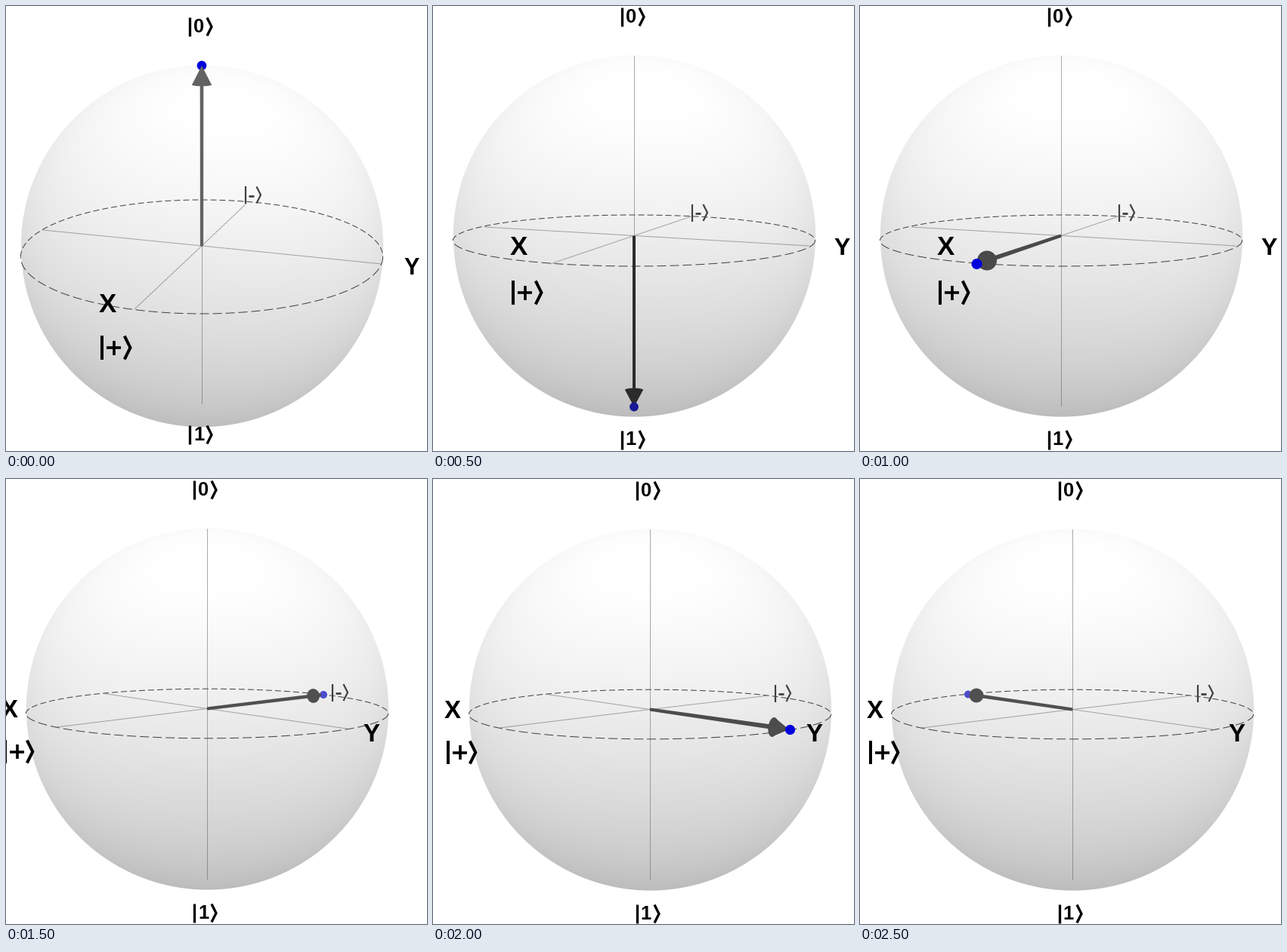
Recreate the animation shown at these times as a matplotlib script. Size 557 by 590 pixels, loop 3 s.

```python
import matplotlib.pyplot as plt
import numpy as np
from matplotlib.animation import ArtistAnimation
from matplotlib.patches import Circle, Polygon

W, H, DPI = 557, 590, 64
PT = 72 / DPI  # points per pixel
R = 239.6
INK, THIN, FAINT = "#000000", "#585858", "#404040"
BLUE, DIM_BLUE, DARK_BLUE = "#0000dc", "#4c4ccb", "#181896"

fig = plt.figure(figsize=(W / DPI, H / DPI), dpi=DPI, facecolor="white")
ax = fig.add_axes([0, 0, 1, 1])
ax.axis("off")

# Camera views; every position is an offset in pixels from the origin of the axes.
HIGH = dict(
    light=(0.25, 0.70), ring=(14.5, 75.5), z_end=210,
    x_axis=((-89, 84), (59, -56)), y_axis=((-210, -21), (238, 24)),
    X=(-125, 88, 35), Y=(277.5, 38, 30.5),
    plus=(-132, 119, 32), minus=(58, -79), zero=(-16, -303), one=(-16, 238))
LEVEL = dict(
    light=(0.10, 0.79), ring=(6.5, 34), z_end=225,
    x_axis=((-111, 37.5), (76, -25.5)), y_axis=((-198, -11.5), (231, 13.5)),
    X=(-153, 26.5, 35), Y=(275.5, 26.5, 32),
    plus=(-160, 59.5, 32), minus=(77, -42), zero=(-16, -302.5), one=(-16, 258))
TURNED = dict(
    light=(0.0, 0.80), ring=(6.5, 32.8), z_end=226,
    x_axis=((-199, 24.5), (154, -18)), y_axis=((-136, -20), (185, 26.5)),
    X=(-261.5, 12, 33), Y=(217.5, 43.5, 33),
    plus=(-267, 41.5, 31), minus=(166, -33), zero=(-17, -302.5), one=(-17, 258.5))

# Arrow: cone base, cone tip, half width, roundness of the base, shaft end width, colour.
# Dot: position, radius, colour, whether it lies in front of the arrow.
POSES = [
    (HIGH, (259, 318), ((0, -213.5), (0, -239), 13, 0.14, 4.6, "#626262"),
     ((0, -239), 6.3, BLUE, False)),
    (LEVEL, (266, 304.5), ((0, 204.5), (0, 227), 12, 0.2, 4.2, "#2b2b2b"),
     ((0, 227), 5.9, DARK_BLUE, True)),
    (LEVEL, (266, 304.5), ((-98, 33), (-110, 37), 13, 1.0, 6, "#4a4a4a"),
     ((-111.5, 37.5), 7, BLUE, True)),
    (TURNED, (266, 304.5), ((140.5, -17), (152, -18.5), 9.4, 0.88, 4.6, "#505050"),
     ((154, -18.5), 5, DIM_BLUE, False)),
    (TURNED, (287, 305.5), ((163, 23.5), (184, 26.5), 13, 0.5, 6.2, "#4c4c4c"),
     ((185.5, 27), 6.6, BLUE, True)),
    (TURNED, (281, 305.5), ((-127, -18.5), (-136, -20), 9.4, 1.0, 4.6, "#505050"),
     ((-138, -20), 5, DIM_BLUE, False)),
]


def sphere(origin, light):
    """Softly lit ball on white, darkening towards the rim and the bottom."""
    px, py = np.meshgrid(np.arange(W), np.arange(H))
    x, y = (px - origin[0]) / R, (origin[1] - py) / R
    r = np.hypot(x, y)
    z = np.sqrt(np.clip(1 - r**2, 0, 1))
    lx, ly = light
    lit = x * lx + y * ly + z * np.sqrt(1 - lx**2 - ly**2)
    dark = (0.06 * (1 - lit) + 0.062 * np.clip(1 - y, 0, 2) ** 1.3
            + 0.025 * r**6 - 0.018)
    cover = np.clip((1 - r) * R + 0.5, 0, 1)
    gray = 1 - np.clip(dark, 0, 1) * cover
    return ax.imshow(np.dstack([gray] * 3), extent=(0, W, H, 0),
                     interpolation="nearest", zorder=0)


class Scene:
    """Collects the artists of one picture, placed relative to its origin."""

    def __init__(self, origin):
        self.origin = np.array(origin, float)
        self.artists = []

    def line(self, pts, width=1, color=THIN, z=2, **style):
        p = np.asarray(pts, float) + self.origin
        style.setdefault("solid_capstyle", "butt")
        self.artists += ax.plot(p[:, 0], p[:, 1], color=color, lw=width * PT,
                                zorder=z, **style)

    def fill(self, pts, color, z):
        self.artists.append(ax.add_patch(
            Polygon(np.asarray(pts) + self.origin, fc=color, ec="none", zorder=z)))

    def dot(self, pos, radius, color, front):
        self.artists.append(ax.add_patch(
            Circle(self.origin + pos, radius, fc=color, ec="none",
                   zorder=5 if front else 3)))

    def text(self, x, base, size, s):
        self.artists.append(ax.text(
            x + self.origin[0], base + self.origin[1] - 0.5, s, color=INK,
            family="Liberation Sans", weight="bold", size=size * PT,
            ha="center", va="baseline", zorder=6))

    def ket(self, x, top, h, reach, width, color=INK):
        """Bar and closing angle bracket; the symbol between is added apart."""
        style = dict(width=width, color=color, z=6)
        self.line([(x, top), (x, top + h)], **style)
        d = 0.24 * h
        self.line([(x + reach - d, top + 0.5), (x + reach, top + h / 2),
                   (x + reach - d, top + h - 0.5)],
                  solid_joinstyle="miter", **style)

    def ring(self, drop, ry):
        for start, dashes in ((0, (12, 5)), (np.pi, (8, 4))):
            t = np.linspace(start, start + np.pi, 200)
            self.line(np.c_[R * np.cos(t), drop + ry * np.sin(t)],
                      color=FAINT, ls=(0, dashes))

    def arrow(self, base, tip, half, roundness, end_width, color):
        base, tip = np.array(base, float), np.array(tip, float)
        along = base / np.hypot(*base)
        side = np.array([-along[1], along[0]])
        w0, w1 = 2.1, end_width / 2
        self.fill([side * w0, base + side * w1, base - side * w1, -side * w0],
                  color, 4)
        t = np.linspace(0, 2 * np.pi, 60)[:, None]
        self.fill(base + half * (np.cos(t) * side + roundness * np.sin(t) * along),
                  color, 4)
        self.fill([base + side * half, tip, base - side * half], color, 4)


def labels(s, view):
    s.text(*view["X"], "X")
    s.text(*view["Y"], "Y")
    for name, digit in (("zero", "0"), ("one", "1")):
        x, top = view[name]
        s.ket(x, top, 25, 29, 3.3)
        s.text(x + 12, top + 20.5, 25.5, digit)

    x, top, h = view["plus"]
    s.ket(x, top, h, 1.17 * h, 4)
    cx, cy = x + 15.5, top + h / 2
    s.line([(cx - 9.5, cy), (cx + 9.5, cy)], 3.6, INK, 6)
    s.line([(cx, cy - 9.5), (cx, cy + 9.5)], 3.6, INK, 6)

    x, top = view["minus"]
    s.ket(x, top, 23, 20, 2.2, FAINT)
    s.line([(x + 3.5, top + 12.5), (x + 10.5, top + 12.5)], 2.8, FAINT, 6)


def picture(view, origin, arrow, dot):
    s = Scene(origin)
    s.artists.append(sphere(origin, view["light"]))
    s.ring(*view["ring"])
    dotted = dict(ls=(0, (1, 1)))
    for end in view["x_axis"] + view["y_axis"] + ((0, -239), (0, view["z_end"])):
        s.line([(0, 0), end], **dotted)
    s.arrow(*arrow)
    s.dot(*dot)
    labels(s, view)
    return s.artists


pictures = [picture(*pose) for pose in POSES]
ax.set_xlim(0, W)
ax.set_ylim(H, 0)
ax.set_aspect("auto")

anim = ArtistAnimation(fig, pictures, interval=500, repeat=True, repeat_delay=0)
plt.show()
```
